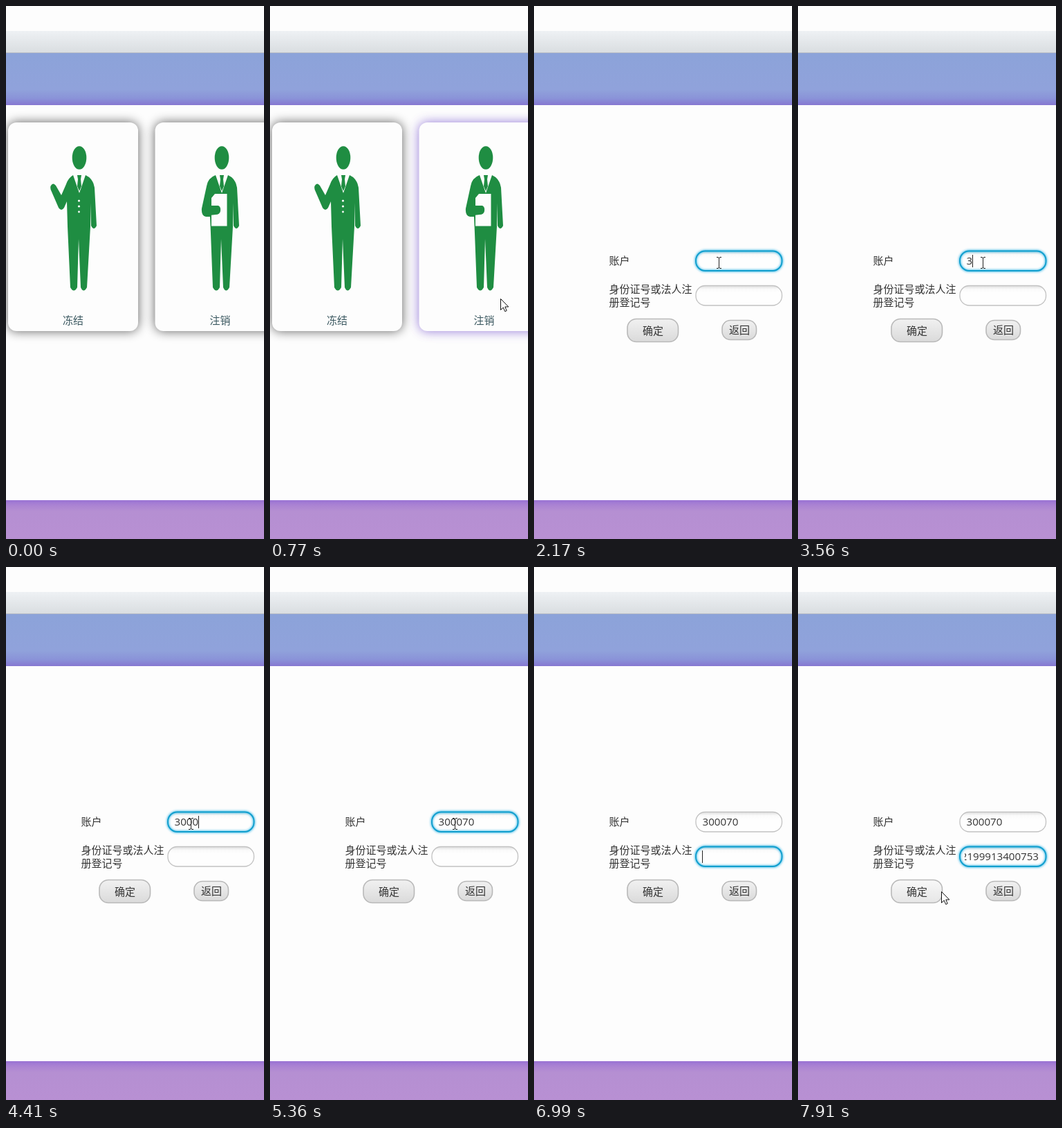
An HTML page for the animation above (8 s loop, 373x769 px).

```html
<!DOCTYPE html>
<html lang="zh-CN">
<head>
<meta charset="utf-8">
<title>账户</title>
<style>
html, body { margin: 0; width: 100%; height: 100%; overflow: hidden; background: #fdfdfd; }
svg { display: block; width: 373px; height: 769px; }
text { font: 15px "Noto Sans CJK SC", "Noto Sans CJK", "Noto Sans CJK JP", sans-serif; fill: #333; }
.num { font: 15.1px "Open Sans", "Noto Sans", sans-serif; }
.mid { text-anchor: middle; }
.card text { fill: #3b5860; }
.man { fill: #1f8d42; filter: url(#soft); }
.man .w { fill: #fdfdfd; }
</style>
</head>
<body>
<svg viewBox="0 0 373 769" xmlns="http://www.w3.org/2000/svg">
  <defs>
    <linearGradient id="bar" x2="0" y2="1">
      <stop stop-color="#eef1f4"/><stop offset="1" stop-color="#d9dde0"/>
    </linearGradient>
    <linearGradient id="blue" x2="0" y2="1">
      <stop stop-color="#8ca3d9"/><stop offset=".7" stop-color="#90a2db"/>
      <stop offset=".87" stop-color="#8a93d8"/><stop offset="1" stop-color="#8677d1"/>
    </linearGradient>
    <linearGradient id="foot" x2="0" y2="1">
      <stop stop-color="#9972d4"/><stop offset=".12" stop-color="#aa82d3"/>
      <stop offset=".28" stop-color="#b58fd2"/><stop offset="1" stop-color="#b890d3"/>
    </linearGradient>
    <linearGradient id="btn" x2="0" y2="1">
      <stop stop-color="#f1f1f1"/><stop offset="1" stop-color="#dadada"/>
    </linearGradient>
    <linearGradient id="lit" x2="0" y2="1">
      <stop stop-color="#f8f8f8"/><stop offset="1" stop-color="#e6e6e6"/>
    </linearGradient>
    <linearGradient id="dip" x2="0" y2="1">
      <stop stop-color="#dedede"/><stop offset=".18" stop-color="#fafafa"/><stop offset=".35" stop-color="#fefefe"/>
    </linearGradient>
    <filter id="shade" x="-30%" y="-30%" width="160%" height="160%"><feGaussianBlur stdDeviation="8"/></filter>
    <filter id="soft"><feGaussianBlur stdDeviation=".7"/></filter>
    <filter id="glow" x="-10%" y="-30%" width="120%" height="160%"><feGaussianBlur stdDeviation="1.4"/></filter>
    <clipPath id="page"><rect y="143" width="373" height="570"/></clipPath>
    <clipPath id="inner"><rect x="241" y="404" width="109" height="28"/></clipPath>
  </defs>

  <rect width="373" height="769" fill="#fdfdfd"/>
  <rect y="36" width="373" height="32" fill="url(#bar)"/>
  <rect y="67" width="373" height="1" fill="#b4bac6"/>
  <rect y="68" width="373" height="75" fill="url(#blue)"/>
  <rect y="713" width="373" height="56" fill="url(#foot)"/>

  <g id="cards" class="card" clip-path="url(#page)">
    <g id="shadows"></g>
    <rect x="3" y="168" width="188" height="301" rx="12" fill="#fdfdfd"/>
    <rect x="215.5" y="168" width="188" height="301" rx="12" fill="#fdfdfd"/>
    <g class="man">
      <ellipse cx="106" cy="219" rx="10.3" ry="16.8"/>
      <path d="M97 244Q90 248 87 257L80 273L72 259Q68 254 65 259Q63 262 66 268L76 291Q80 297 84 291L88 282L89 318L93 406Q98 415 103 406L105 336L108 406Q112 415 117 406L122 318V284L123 317Q127 325 131 317L128 262Q126 249 115 244L106 270Z"/>
      <path d="M103 244H109L108 250L109 260L106 267L103 260L104 250Z"/>
      <g class="w"><circle cx="105.5" cy="281" r="1.6"/><circle cx="105.5" cy="289" r="1.6"/><circle cx="105.5" cy="297" r="1.4"/></g>
    </g>
    <g class="man">
      <ellipse cx="312" cy="219" rx="10.3" ry="16.8"/>
      <path d="M303 244Q292 248 290 260L283 292Q282 303 289 304H295L296 328L299 406Q304 415 309 406L311 336L314 406Q318 415 323 406L328 318V284L329 317Q333 325 337 317L334 262Q332 249 321 244L312 270Z"/>
      <path d="M309 244H315L314 250L315 260L312 267L309 260L310 250Z"/>
      <path class="w" d="M297 277L302 271H319.500V317.500H297Z"/>
      <path d="M286 287L297 288H307Q311 290 310 296Q309 301 303 301L286 303Z"/>
    </g>
    <text class="mid" x="97" y="459">冻结</text>
    <text class="mid" x="309.5" y="459">注销</text>
  </g>

  <g id="form">
    <text x="108.500" y="373">账户</text>
    <text x="108.500" y="414">身份证号或法人注</text>
    <text x="108.500" y="433">册登记号</text>
    <g id="fields"></g>
    <text id="acct" class="num" x="243.500" y="373"></text>
    <g clip-path="url(#inner)"><text id="reg" class="num" x="348" y="423" text-anchor="end"></text></g>
    <rect id="caret" width="1" height="18" fill="#222"/>
    <rect id="ok" x="135" y="451.500" width="73.500" height="33" rx="13" stroke="#b9b9b9" stroke-width="1.600"/>
    <text class="mid" x="172" y="474">确定</text>
    <rect x="272" y="453.500" width="49.500" height="28" rx="12" fill="url(#btn)" stroke="#b9b9b9" stroke-width="1.600"/>
    <text class="mid" x="297" y="473">返回</text>
  </g>

  <path id="arrow" d="M.5.5V16.500L4.200 13L6.700 18.700L9.200 17.600L6.800 12H11.800Z" fill="#fff" stroke="#111" stroke-width="1"/>
  <path id="beam" d="M-3 -7.500H-1L.5 -6.500L2 -7.500H4M-3 8.500H-1L.5 7.500L2 8.500H4M.5 -7V8" fill="none"/>
</svg>
<script>
const LOOP = 8000, ACCT = "300070", REG = "2199913400753", DIGIT = 8.63;
const $ = id => document.getElementById(id);
const show = (el, on) => el.setAttribute("visibility", on ? "visible" : "hidden");
const NS = "http://www.w3.org/2000/svg";

function add(parent, attrs) {
  const el = document.createElementNS(NS, "rect");
  for (const k in attrs) el.setAttribute(k, attrs[k]);
  return parent.appendChild(el);
}

function shadow(x) {
  return add($("shadows"), { x, y: 168, width: 188, height: 301, rx: 12, filter: "url(#shade)", fill: "#000", opacity: .62 });
}

// Returns the focus ring, two layers whose opacity is set over time.
function field(y) {
  const box = { x: 234, y: y + .5, width: 124.5, height: 28.5, rx: 13.5, fill: "none" };
  add($("fields"), { ...box, fill: "url(#dip)", stroke: "#c2c2c2", "stroke-width": 1.3 });
  return [
    add($("fields"), { ...box, stroke: "#6cc9ec", "stroke-width": 4, filter: "url(#glow)" }),
    add($("fields"), { ...box, stroke: "#119fce", "stroke-width": 1.9 })
  ];
}

shadow(3);
const hover = shadow(215.5);
const ring1 = field(353), ring2 = field(403);

// time, kind, x, y
const moves = [
  [0, ""],
  [370, "arrow", 354, 555], [450, "arrow", 336, 528], [530, "arrow", 327, 512],
  [610, "arrow", 327, 468], [690, "arrow", 331, 434], [770, "arrow", 333, 422],
  [970, "beam", 336, 423], [1080, "arrow", 328, 445],
  [1230, "beam", 318, 421], [1310, "beam", 296, 402], [1390, "beam", 276, 380], [1460, "beam", 267, 370],
  [5820, "beam", 271, 418], [5890, "arrow", 281, 560], [5960, "arrow", 294, 700], [6040, ""],
  [7530, "arrow", 290, 468], [7610, "arrow", 268, 468], [7690, "arrow", 246, 467],
  [7760, "arrow", 226, 467], [7840, "arrow", 212, 468], [7910, "arrow", 207, 468]
];
const keys = [3560, 3790, 3940, 4410, 4810, 4890];
const blinks = [1630, 2170, 2700, 3160, 3560, 5360, 5820, 6360, 6830, 7530];
const count = (list, t) => list.filter(k => k <= t).length;
const part = (list, t) => count(list, t) / list.length;
const setRing = (ring, v) => ring.forEach(r => r.setAttribute("opacity", v));

function draw(t) {
  const open = t >= 920;
  show($("cards"), !open);
  show($("form"), open);

  const lit = t >= 610;
  hover.setAttribute("fill", lit ? "#6a45c8" : "#000");
  hover.setAttribute("opacity", lit ? .72 : .62);

  setRing(ring1, part([1630, 1700, 1770], t) - part([6680, 6830], t));
  setRing(ring2, part([6830, 6910, 6980], t));

  const typed = count(keys, t), second = t >= 6830, pasted = t >= 7290;
  $("acct").textContent = ACCT.slice(0, typed);
  $("reg").textContent = pasted ? REG : "";

  show($("caret"), open && count(blinks, t) % 2);
  const cx = second ? (pasted ? 348 : 243) : 243 + typed * DIGIT;
  $("caret").setAttribute("x", Math.round(cx));
  $("caret").setAttribute("y", second ? 409 : 359);
  $("ok").setAttribute("fill", t >= 7840 ? "url(#lit)" : "url(#btn)");

  const [, kind, x, y] = moves[count(moves.map(m => m[0]), t) - 1];
  for (const id of ["arrow", "beam"]) {
    show($(id), id === kind);
    if (id === kind) $(id).setAttribute("transform", `translate(${x} ${y})`);
  }
  $("beam").setAttribute("stroke", t < 1080 ? "#2f9c3c" : "#222");
}

const start = performance.now();
function tick() {
  draw((performance.now() - start) % LOOP);
  requestAnimationFrame(tick);
}
tick();
</script>
</body>
</html>
```
